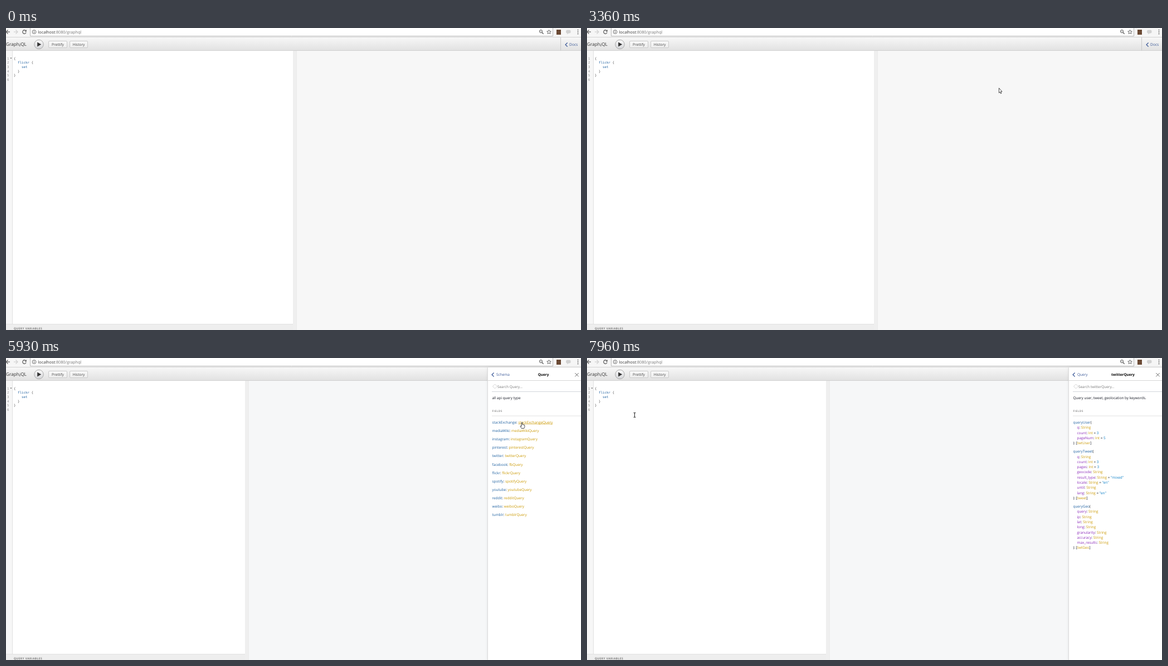
Recreate the animation shown at these times as an HTML page with a canvas. Size 1032 by 543 pixels, loop 8000 ms.

```html
<!DOCTYPE html>
<html lang="en">
<head>
<meta charset="utf-8">
<title>GraphiQL docs explorer</title>
<style>
  html, body { margin: 0; width: 100%; height: 100%; overflow: hidden; background: #fff; }
  canvas { display: block; }
</style>
</head>
<body>
<canvas id="stage" width="1032" height="543"></canvas>
<script>
const ctx = document.getElementById('stage').getContext('2d');
const LOOP = 8000, STEP = 75;
const SANS = '"Open Sans", "Noto Sans", sans-serif';
const MONO = '"DejaVu Sans Mono", "Liberation Mono", monospace';
const SERIF = '"Liberation Serif", serif';
const INK = '#141823', BLUE = '#1f61a0', GOLD = '#ca9800', PURPLE = '#8b2bb9',
      RED = '#b11a04', VALUE = '#0b7fc7', NAV = '#3b5998', GREY = '#777';

// Pointer visits: each lasts until `end` and follows [time, x, y] stops.
const visits = [
  { end: 1780, stops: [[360, 236, 32], [920, 196, 9.5], [1699, 196, 9.5], [1700, 201, 5]] },
  { end: 2860, stops: [[2560, 518, 47]] },
  { end: 7560, stops: [
    [3190, 585, 72], [3360, 739, 107.5], [3640, 930, 70], [3970, 1003, 25], [4209, 1003, 25],
    [4440, 969, 127.5], [4760, 895, 130], [4919, 895, 130], [5000, 897, 125], [5229, 897, 125],
    [5230, 896, 122], [5690, 926, 116], [5930, 926, 116], [6200, 902, 170], [6470, 893, 241],
    [6700, 897, 205], [6780, 897, 205], [7020, 900, 177], [7340, 900, 177], [7490, 656, 84]] },
  { end: LOOP, stops: [[7720, 154, 9.5], [7960, 85.5, 102.5]] }
];

const services = ['stackExchange', 'mediaWiki', 'instagram', 'pinterest', 'twitter', 'facebook',
  'flickr', 'spotify', 'youtube', 'reddit', 'weibo', 'tumblr'];

const methods = [
  ['queryUser', 'twtUser', ['q: String', 'count: Int = 3', 'pageNum: Int = 5']],
  ['queryTweet', 'tweet', ['q: String', 'count: Int = 3', 'pages: Int = 3', 'geocode: String',
    'result_type: String = "mixed"', 'locale: String = "en"', 'until: String', 'lang: String = "en"']],
  ['queryGeo', 'twtGeo', ['query: String', 'ip: String', 'lat: String', 'long: String',
    'granularity: String', 'accuracy: String', 'max_results: String']]
];

let pointer = null, hovering = false;

function pointerAt(t) {
  const visit = visits.find(v => t >= v.stops[0][0] && t < v.end);
  if (!visit) return null;
  const { stops } = visit;
  const i = stops.findLastIndex(s => t >= s[0]);
  const [t0, x0, y0] = stops[i];
  const [t1, x1, y1] = stops[i + 1] || [t0 + 1, x0, y0];
  const n = Math.max(1, Math.round((t1 - t0) / STEP));
  const u = Math.floor((t - t0) / (t1 - t0) * n) / n;
  return { x: x0 + (x1 - x0) * u, y: y0 + (y1 - y0) * u };
}

function rect(x, y, w, h, fill) {
  ctx.fillStyle = fill;
  ctx.fillRect(x, y, w, h);
}

function shade(y0, y1, top, bottom) {
  const g = ctx.createLinearGradient(0, y0, 0, y1);
  g.addColorStop(0, top);
  g.addColorStop(1, bottom);
  return g;
}

function line(points, color, width = 1, close = false, fill = null) {
  ctx.beginPath();
  points.forEach(([x, y]) => ctx.lineTo(x, y));
  if (close) ctx.closePath();
  if (fill) { ctx.fillStyle = fill; ctx.fill(); }
  if (!color) return;
  ctx.strokeStyle = color;
  ctx.lineWidth = width;
  ctx.stroke();
}

function circle(x, y, r, stroke, width = 1, fill = null, from = 0, to = Math.PI * 2) {
  ctx.beginPath();
  ctx.arc(x, y, r, from, to);
  if (fill) { ctx.fillStyle = fill; ctx.fill(); }
  if (!stroke) return;
  ctx.strokeStyle = stroke;
  ctx.lineWidth = width;
  ctx.stroke();
}

// Draws text centred on a line at y and returns its width.
function text(s, x, y, size, color, { weight = '400', font = SANS, align = 'left', spacing = 0 } = {}) {
  ctx.font = `${weight} ${size}px ${font}`;
  ctx.textAlign = align;
  ctx.letterSpacing = spacing + 'px';
  ctx.fillStyle = color;
  ctx.fillText(s, x, y + size * 0.36);
  return ctx.measureText(s).width;
}

// Parts are [text, color, isLink].
function run(x, y, parts) {
  for (const [s, color, isLink] of parts) {
    const w = text(s, x, y, 6.4, color);
    if (isLink && pointer && pointer.x >= x && pointer.x <= x + w && Math.abs(pointer.y - y) < 3.6) {
      hovering = true;
      rect(x, y + 3, w, 0.6, color);
    }
    x += w;
  }
}

function browserBar(t) {
  const loading = t >= 2560 && t < 2860, selected = t >= 1390 && t < 2560;
  rect(0, 0, 1032, 17, '#f6f6f6');
  rect(43, 0, 939, 14, '#fff');
  line([[43.5, 0], [43.5, 14.5], [981.5, 14.5], [981.5, 0]], '#b9b9b9');
  rect(0, 16, 1032, 1, '#d2d2d2');

  const dark = '#5a5a5a';
  line([[7, 7], [0, 7]], dark, 1.2);
  line([[3.5, 3.5], [0, 7], [3.5, 10.5]], dark, 1.2);
  line([[14, 7], [21, 7]], '#d0d0d0', 1.2);
  line([[17.5, 3.5], [21, 7], [17.5, 10.5]], '#d0d0d0', 1.2);
  if (loading) {
    line([[30, 4], [36, 10]], dark, 1.3);
    line([[36, 4], [30, 10]], dark, 1.3);
  } else {
    circle(33, 7, 3.2, dark, 1.2, null, 0.3, 5.5);
    line([[36.8, 3], [36.8, 6.4], [33.4, 6.4]], null, 1, true, dark);
  }

  circle(50.5, 7, 3.4, dark, 0.9);
  rect(50, 6.4, 1, 2.6, dark);
  rect(50, 4.8, 1, 1, dark);
  if (selected) rect(57, 1, 79, 11, '#3390ff');
  const w = text('localhost', 57.5, 7, 7.28, selected ? '#fff' : '#333');
  text(':8080/graphql', 57.5 + w, 7, 7.28, selected ? '#fff' : '#777');

  circle(960, 6, 2.6, dark, 1);
  line([[962, 8], [964.6, 10.8]], dark, 1.3);
  line([[958.8, 6], [961.2, 6]], dark, 0.7);
  const star = Array.from({ length: 10 }, (_, i) => {
    const a = i * Math.PI / 5 - Math.PI / 2, r = i % 2 ? 1.8 : 4;
    return [974.5 + r * Math.cos(a), 7.3 + r * Math.sin(a)];
  });
  line(star, dark, 0.9, true);
  rect(988, 3, 8, 9, '#6b4a35');
  ctx.beginPath();
  ctx.roundRect(1005, 3.5, 8.5, 6, 2.5);
  ctx.fillStyle = '#d2d2d2';
  ctx.fill();
  line([[1007, 9], [1010, 9], [1007.5, 11.5]], null, 1, true, '#d2d2d2');
  for (const y of [3.6, 7, 10.4]) circle(1026.5, y, 0.95, null, 1, dark);
}

function button(label, x, w) {
  ctx.beginPath();
  ctx.roundRect(x + 0.5, 23.5, w - 1, 12, 1.5);
  ctx.fillStyle = shade(23, 36, '#fafafa', '#ececec');
  ctx.fill();
  ctx.strokeStyle = '#cbcbcb';
  ctx.lineWidth = 1;
  ctx.stroke();
  text(label, x + w / 2, 29.5, 6.5, '#444', { align: 'center' });
}

function chevron(x) {
  line([[x + 3.6, 26.5], [x, 30], [x + 3.6, 33.5]], NAV, 1.2);
}

function toolbar(docsOpen) {
  rect(0, 17, 1032, 23, shade(17, 40, '#f7f7f7', '#e2e2e2'));
  rect(0, 40, 1032, 1, '#d0d0d0');
  let x = text('Graph', 0, 29.5, 8.2, '#333');
  x += text('i', x, 29.5, 8.8, '#333', { weight: 'italic 400', font: SERIF });
  text('QL', x, 29.5, 8.2, '#333');
  circle(59, 29.5, 8.2, '#a8a8a8', 1, shade(21, 38, '#fdfdfd', '#d2d3d6'));
  line([[56.2, 25.4], [63.2, 29.5], [56.2, 33.6]], null, 1, true, '#333');
  button('Prettify', 76, 34);
  button('History', 114, 33);
  if (docsOpen) return;
  rect(995, 17, 1, 24, '#c8c8c8');
  chevron(1004);
  text('Docs', 1011, 30, 6.7, NAV);
}

function panes(t, split, right) {
  rect(0, 41, split, 502, '#fff');
  rect(0, 41, 11, 491, '#f7f7f7');
  rect(11, 41, 1, 491, '#e0e0e0');
  rect(split, 41, 6, 502, '#efefef');
  rect(split + 6, 41, right - split - 6, 502, right < 1032 ? '#f6f7f8' : '#f7f7f7');
  rect(split + 6, 41, 1, 502, '#ebebeb');
  rect(0, 532, split, 11, '#eeeeee');
  rect(0, 532, split, 1, '#e0e0e0');
  text('QUERY VARIABLES', 14, 539.8, 4.9, GREY, { weight: '700', spacing: 0.48 });

  const mono = { font: MONO };
  const rowY = i => 54.6 + i * 7.62;
  for (let i = 0; i < 6; i++) text(String(i + 1), 2, rowY(i), 5.8, '#999', mono);
  ['{', '  flickr {', '    set', '  }', '}'].forEach((code, i) => {
    let x = 14;
    for (const s of code.match(/\s+|\w+|[{}]/g)) {
      x += text(s, x, rowY(i), 5.8, /\w/.test(s) ? BLUE : '#555', mono);
    }
  });
  const folded = t >= 2860 && t < 3490;
  if (!folded) line([[7.4, 53.6], [10.6, 53.6], [9, 55.6]], null, 1, true, '#666');

  if (t >= 2700 && t < 3190) {
    rect(0, 538, 65, 5, '#f2f2f2');
    line([[0, 538.5], [64.5, 538.5], [64.5, 543]], '#c8c8c8');
  }
}

function heading(label, y) {
  text(label, 872.5, y, 4.75, GREY, { weight: '600', spacing: 0.5 });
  rect(872, y + 8, 160, 1, '#e0e0e0');
}

function docsFrame(title, center, back, search, description) {
  ctx.save();
  ctx.shadowColor = 'rgba(0,0,0,.15)';
  ctx.shadowBlur = 4;
  rect(865, 17, 167, 526, '#fff');
  ctx.restore();
  rect(0, 16, 1032, 1, '#d2d2d2');
  rect(864, 17, 1, 526, '#dcdcdc');
  rect(865, 40, 167, 1, '#d6d6d6');
  text(title, center, 29.5, 6.4, '#000', { weight: '700', align: 'center' });
  if (back) {
    chevron(872);
    text(back, 880, 29.7, 6.5, NAV);
  }
  line([[1021.3, 27], [1027.7, 33.4]], '#555', 0.9);
  line([[1027.7, 27], [1021.3, 33.4]], '#555', 0.9);
  line([[873.5, 51], [877.5, 47], [881.5, 51], [877.5, 55]], '#c4c4c4', 0.7, true);
  text(`Search ${search}...`, 882, 51.2, 6.4, GREY);
  rect(872, 60, 160, 1, '#d3d6db');
  description.forEach((s, i) => text(s, 872.5, 71.2 + i * 9.2, 6.4, INK));
}

function schemaPage() {
  docsFrame('Documentation Explorer', 944.5, '', 'Schema',
    ['A GraphQL schema provides a root type for each', 'kind of operation.']);
  heading('ROOT TYPES', 104.7);
  run(872.5, 125, [['query', RED], [': ', INK], ['Query', GOLD, true]]);
}

function queryPage() {
  docsFrame('Query', 964.5, 'Schema', 'Query', ['all api query type']);
  heading('FIELDS', 95.6);
  services.forEach((name, i) => {
    const type = (name === 'facebook' ? 'fb' : name) + 'Query';
    run(872.5, 115.6 + i * 15.13, [[name, BLUE, true], [': ', INK], [type, GOLD, true]]);
  });
}

function twitterPage() {
  docsFrame('twitterQuery', 962, 'Query', 'twitterQuery',
    ['Query user, tweet, geolocation by keywords.']);
  heading('FIELDS', 95.6);
  let y = 115.6;
  for (const [name, type, args] of methods) {
    run(872.5, y, [[name, BLUE, true], ['(', INK]]);
    for (const arg of args) {
      const [, key, kind, value] = arg.match(/(\w+): (\w+)(?: = (.+))?/);
      const parts = [[key, PURPLE], [': ', INK], [kind, GOLD, true]];
      if (value) parts.push([' = ', INK], [value, VALUE]);
      run(879.5, y += 9.3, parts);
    }
    run(872.5, y += 9.3, [['): [', INK], [type, GOLD, true], [']', INK]]);
    y += 15.1;
  }
}

function drawPointer(split, docsOpen) {
  const { x, y } = pointer;
  const overText = (y < 15 && x < 980) || (y > 41 && y < 532 && x > 12 && x < split);
  const overDocs = !docsOpen && x > 996 && y > 17 && y < 41;
  const shape = points => line(points.map(([a, b]) => [x + a, y + b]), '#222', 0.8, true, '#fff');
  if (overText) {
    line([[x, y - 4], [x, y + 4]], '#222', 1);
    for (const d of [-4, 4]) line([[x - 2, y + d], [x + 2, y + d]], '#222', 0.9);
  } else if (hovering || overDocs) {
    shape([[-0.8, 0], [0.8, 0], [0.8, 3.6], [4.6, 4.4], [5, 7.5], [3.8, 10.5],
      [-0.8, 10.5], [-3, 6.8], [-2.4, 5.8], [-0.8, 7]]);
  } else {
    shape([[0.4, 0.4], [0.4, 9.2], [2.2, 7.5], [3.5, 10.5], [4.8, 9.9], [3.6, 7], [6, 6.8]]);
  }
}

function draw(t) {
  const docsOpen = t >= 4210;
  const split = docsOpen ? 429 : 515;
  pointer = pointerAt(t);
  hovering = false;
  ctx.textRendering = 'geometricPrecision';
  rect(0, 0, 1032, 543, '#fff');
  toolbar(docsOpen);
  panes(t, split, docsOpen ? 865 : 1032);
  browserBar(t);
  if (t >= 7340) twitterPage();
  else if (t >= 5230) queryPage();
  else if (docsOpen) schemaPage();
  if (pointer) drawPointer(split, docsOpen);
}

const start = performance.now();
function tick() {
  draw((performance.now() - start) % LOOP);
  requestAnimationFrame(tick);
}
tick();
</script>
</body>
</html>
```
